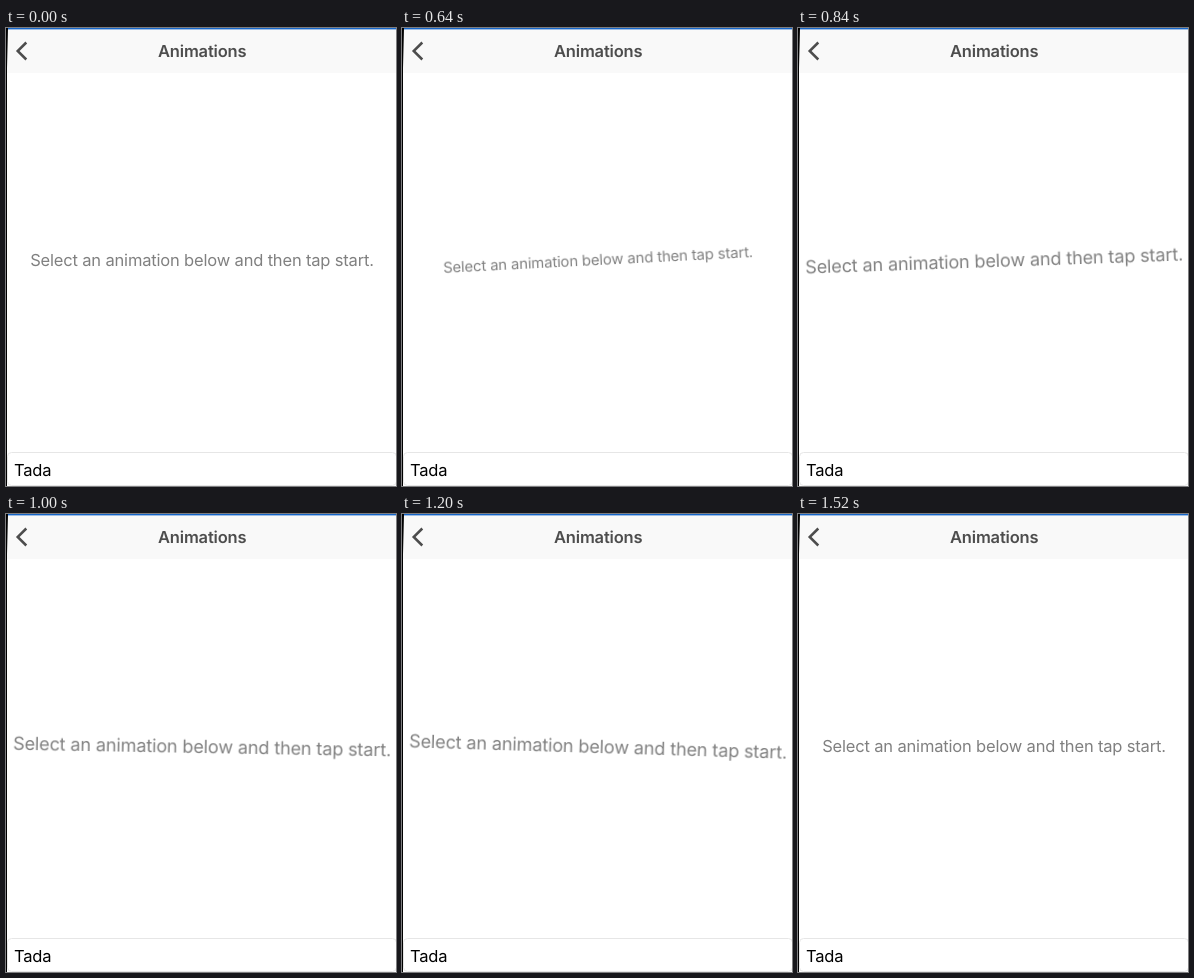
Recreate the animation shown at these times as an HTML page. Size 390 by 458 pixels, loop 1.92 s.

```html
<!DOCTYPE html>
<html lang="en">
<head>
<meta charset="utf-8">
<title>Animations</title>
<style>
  html, body { margin: 0; width: 100%; height: 100%; overflow: hidden; background: #fff; }
  svg { display: block; width: 390px; height: 458px; }
  text {
    font: 16.5px Inter, Roboto, sans-serif;
    letter-spacing: -.17px;
    text-rendering: geometricPrecision;
  }
  .title { font-weight: 600; fill: #4d4d4d; text-anchor: middle; }
  .hint {
    fill: #808080;
    text-anchor: middle;
    transform-origin: 196px 232px;
    animation: tada 1920ms linear infinite;
  }
  /* Shrink and tilt, then wobble while enlarged, then settle. */
  @keyframes tada {
    0%, 22.55% { transform: scale(1) rotate(0deg); }
    33.65% { transform: scale(.9) rotate(-3deg); }
    39.19%, 50.29%, 61.38%, 72.47% { transform: scale(1.1) rotate(3deg); }
    44.74%, 55.83%, 66.93% { transform: scale(1.1) rotate(-3deg); }
    78.02%, 100% { transform: scale(1) rotate(0deg); }
  }
</style>
</head>
<body>
<svg viewBox="0 0 390 458">
  <rect width="390" height="458" fill="#fff"/>
  <rect width="390" height="45" fill="#f9f9f9"/>
  <rect width="390" height="1.4" fill="#1565c8"/>
  <path d="M20.300 14.500 11.700 23l8.600 8.500" fill="none" stroke="#4d4d4d" stroke-width="2.5"/>
  <text class="title" x="196.200" y="29">Animations</text>
  <text class="hint" x="196" y="238">Select an animation below and then tap start.</text>
  <rect x="1.500" y="424.500" width="389" height="33" rx="4" fill="#fff" stroke="#e6e6e6"/>
  <text x="8" y="448">Tada</text>
  <path d="M0 0H2L1 40V458H0Z"/>
</svg>
</body>
</html>
```
